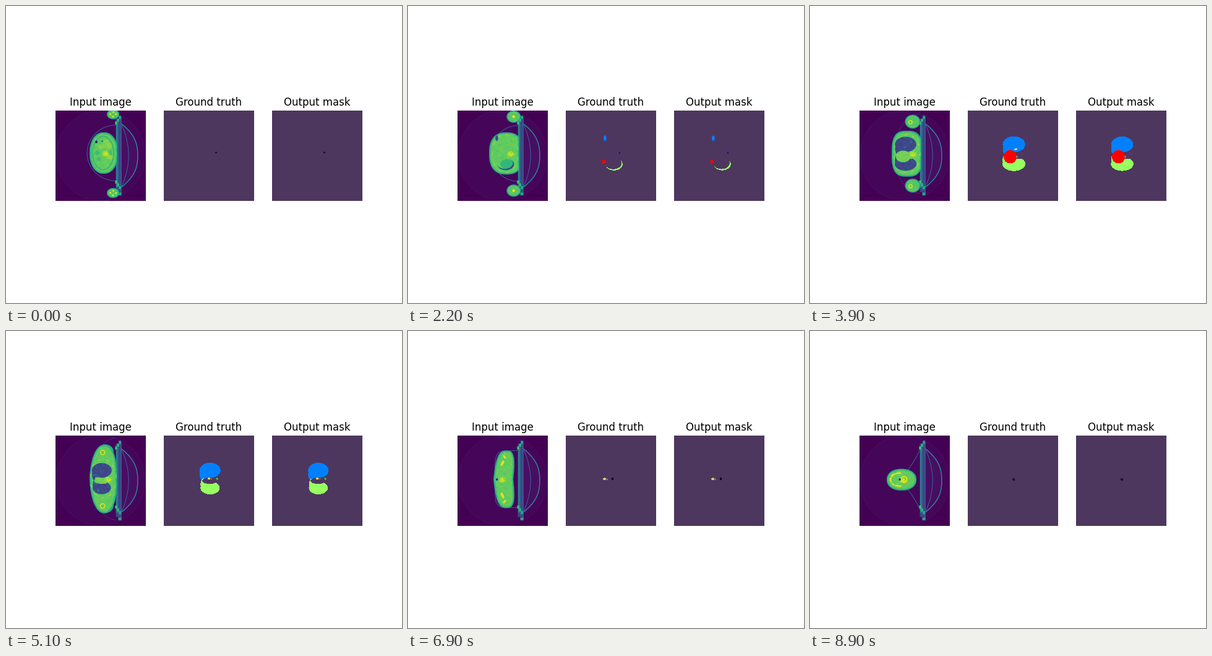
Write a matplotlib script that moves like this. It is 640 px wide and 480 px high and loops after 9000 ms.

```python
import numpy as np
import matplotlib.pyplot as plt
from matplotlib.animation import FuncAnimation

FRAMES, STEP = 90, 100
N = 146
X0, Y0, SIDE = 80.0, 169.46, 145.88
MID = 239
grid = (np.arange(N) + 0.5) * SIDE / N
X, Y = np.meshgrid(X0 + grid, Y0 + grid)

BACK = (77, 55, 94)
BLUE, GREEN, RED = (0, 128, 255), (151, 255, 96), (255, 0, 0)
YELLOW, GREY = (222, 214, 92), (134, 110, 134)
CORD_COLOURS = [(24, 20, 22), (40, 0, 165), (112, 48, 108),
                (70, 172, 48), (12, 2, 10), (46, 0, 62)]

# a few stations along the body, from belly to head
TIMES = [0, 2.2, 3.9, 5.1, 5.9, 6.9, 8.9]
TRACKS = {
    "x": [158, 159, 157, 157, 158, 154, 148],
    "half_w": [23, 28, 25, 22, 20, 16, 24],
    "half_h": [33.5, 34, 37, 55.5, 52, 46.5, 17.5],
    "power": [2.2, 2.5, 3, 2.2, 2.4, 3, 2.2],
    "bow": [0, 0, 0, 2, 2, 5, 0],
    "cord": [164.5, 167, 167.5, 166, 163, 155.5, 154],
    "sheet_h": [45, 45, 64, 66, 56, 46, 50],
    "sheet_p": [2, 2, 2, 2, 2, 6, 0.85],
}


def at(name, t):
    return np.interp(t, TIMES, TRACKS[name])


def ramp(t, a, b):
    return float(np.clip((t - a) / (b - a), 0, 1))


def bump(t, a, b):
    """Half a sine wave between a and b, zero outside."""
    return max(0.0, float(np.sin(np.pi * ramp(t, a, b))))


def fade(t, a, b, c, d):
    return ramp(t, a, b) * (1 - ramp(t, c, d))


# shapes are level sets: f < 0 inside, converted to a pixel distance
def distance(f):
    gy, gx = np.gradient(f)
    return f / np.maximum(np.hypot(gx, gy), 1e-3)


def fill(f):
    return np.clip(0.5 - distance(f), 0, 1)


def line(f, w):
    return np.clip(w / 2 + 0.5 - abs(distance(f)), 0, 1)


def ellipse(x, y, a, b, tilt=0, p=2):
    c, s = np.cos(np.radians(tilt)), np.sin(np.radians(tilt))
    dx, dy = X - x, Y - y
    u, v = (dx * c + dy * s) / a, (dy * c - dx * s) / b
    return (abs(u) ** p + abs(v) ** p) ** (1 / p) - 1


def oval(x, y, a, b, tilt=0):
    if min(a, b) < 0.3:
        return np.zeros_like(X)
    return fill(ellipse(x, y, a, b, tilt))


def box(x, y, a, b):
    return (np.clip(a + 0.5 - abs(X - x), 0, 1)
            * np.clip(b + 0.5 - abs(Y - y), 0, 1))


def lay(img, cover, value, alpha=1.0):
    img += cover * alpha * (value - img)


def scanner():
    """The still part of the scan: gantry disc, couch and its curved shell."""
    img = np.zeros_like(X)
    disc = ellipse(153, 242, 72, 73)
    lay(img, fill(disc), 0.018)
    lay(img, line(disc, 1), 0.035)

    d = abs(Y - 242)
    beyond = X > 185.5
    outer = X - 186 - 26.7 * (1 - (d / 51.5) ** 2.5)
    inner = X - 186 - 12 * (1 - (d / 51.5) ** 2)
    lay(img, fill(outer) * beyond, 0.04)
    lay(img, line(outer, 1.2) * beyond, 0.53)
    lay(img, line(inner, 0.7) * beyond, 0.4)

    lay(img, box(182, 242, 4.5, 59), 0.19)
    lay(img, box(179.3, 242, 1.1, 52), 0.5)
    lay(img, box(182, 242, 0.5, 58), 0.33)
    lay(img, box(185.7, 242, 0.7, 63), 0.32)
    for k in range(3):
        for side in (-1, 1):
            y = 237.2 + side * (47.7 + 4.5 * k)
            lay(img, box(178 + 3 * k, y, 1.8, 2.5), 0.7 - 0.04 * k)
    lay(img, box(184, 304, 2.4, 2.3), 0.6)
    return img


SCANNER = scanner()


def grain(seed):
    g = np.random.default_rng(seed).normal(size=(N, N))
    for axis in (0, 1):
        g = (g + np.roll(g, 1, axis) + np.roll(g, -1, axis)) / 1.8
    return g


def dome(t):
    """How far the liver still pushes into the chest."""
    return 1 - ramp(t, 1.4, 3.2)


def lungs(t, scale=1.0):
    """Coverage of the upper and the lower lung."""
    lift = dome(t)
    parts = []
    for side, start, height in ((-1, 2.18, 13), (1, 1.2, 11.5)):
        s = bump(t, start, 6.4)
        a, b = 18.5 * s ** 0.5 * scale, height * s ** 0.25 * scale
        x = 154.5 + ramp(t, 5, 6) * 2.5 + lift * (6 if side > 0 else -20)
        y = 239.8 + side * (15.8 - 3 * ramp(t, 4, 6)) + lift * (1 if side > 0 else -18)
        cover = oval(x, y, a, b)
        if lift == 0:
            cover = np.maximum(cover, oval(x - 0.65 * a, y - side * 0.55 * b,
                                           0.34 * a, 0.9 * b))
        elif side > 0:
            k = min(1.1, 1.3 * lift ** 0.5)
            cover = cover * (1 - oval(x - 1.3, y - 1.8, a * k, b * k))
        parts.append(cover)
    s = bump(t, 2.18, 6.4)
    gap = oval(162 - 8 * ramp(t, 3.9, 5.1), 242.5, 13 * s ** 0.5, 5.2 * s ** 0.25)
    keep = 1 - gap * (lift == 0)
    return [part * keep for part in parts]


def heart(t):
    r = 12 * bump(t, 2, 4.9)
    return oval(148.5 - 13 * dome(t), 244 + 14 * dome(t), min(r, 10.6), min(r * 1.3, 10.8))


def draw_arms(img, t, tex):
    x = 173 - 0.47 * t * t
    a, b, r = 10 + 0.6 * t, 8 + 0.8 * t, 0.7 * t
    for side in (-1, 1):
        y = MID + side * (63.5 - 0.78 * t * t)
        lay(img, oval(x, y, a, b), 0.6)
        lay(img, oval(x, y, a - 1.5, b - 1.5), 0.74 + 0.01 * tex)
        if t < 1.1:
            for q in np.arange(4) * 1.6 + t:
                lay(img, oval(x + 4.5 * np.cos(q), y + 3.6 * np.sin(q), 1.5, 1.2), 0.97)
        elif r < 2:
            lay(img, oval(x, y, r + 0.7, r + 0.7), 0.97)


def draw_arm_bones(img, t):
    show = fade(t, 2.8, 3, 6, 6.5)
    r = max(0.7 * t, 1)
    for side in (-1, 1):
        bone = ellipse(173 - 0.47 * t * t - 0.9 * t,
                       MID + side * (63.5 - 0.78 * t * t) + 1, r, r)
        lay(img, line(bone, 1.3), 0.98, show)


def draw_belly(img, body, tex, show):
    rng = np.random.default_rng(5)
    lay(img, line(ellipse(157, 238, 17, 27), 2) * body, 0.67, show)
    for _ in range(9):
        q, r = rng.uniform(0, 2 * np.pi), rng.uniform(0.4, 0.75)
        organ = oval(157 + 17 * r * np.cos(q), 238 + 27 * r * np.sin(q),
                     *rng.uniform(3, 6, 2))
        lay(img, organ, rng.choice([0.69, 0.8, 0.82]) + 0.01 * tex, show)
    lay(img, oval(146, 220, 2, 2.2), 0.08, show)
    lay(img, oval(155.5, 219, 1.3, 1.3), 0.35, show)


def scan(i):
    t = i * STEP / 1000
    img, tex = SCANNER.copy(), grain(i)
    cy = 238 + 0.3 * t
    cord = at("cord", t)

    sheet = ellipse(178, cy, 47 - 1.4 * t, at("sheet_h", t), p=at("sheet_p", t))
    glow = 0.4 - 0.25 * fade(t, 2.5, 3.6, 5.9, 6.9)
    img = np.maximum(img, line(sheet, 0.7) * (X < 178) * glow)
    if t < 6:
        draw_arms(img, t, tex)

    half_h = at("half_h", t)
    cx = at("x", t) + at("bow", t) * abs(Y - cy) / half_h
    shape = ellipse(cx, cy, at("half_w", t), half_h, p=at("power", t))
    body = fill(shape) * np.clip(180 - X, 0, 1)
    depth = np.minimum(-distance(shape), 180 - X)
    lay(img, body, 0.58 + 0.18 * np.clip(depth / 3.5, 0, 1) + 0.011 * tex)

    if t < 2:
        draw_belly(img, body, tex, fade(t, -1, 0, 0.9, 2))
    spleen = fade(t, 1, 2, 2.4, 3.1)
    lay(img, oval(160, 256, 11, 8) * body, 0.62, 0.7 * spleen)

    ang = np.arctan2((Y - MID) / 31, (X - 157) / 21)
    dashes = np.clip(3 * np.cos(11 * ang + 1.5 * t) - 1, 0, 1)
    ribs = line(ellipse(157, MID, 21, 31), 1.2) * dashes * body
    lay(img, ribs, 0.92, 0.2 + 0.5 * fade(t, 0, 3, 5.5, 6.2) - 0.2 * ramp(t, 5.5, 6.4))

    air = np.maximum(*lungs(t, 0.95)) * body
    lay(img, air, np.clip(0.22 + 0.02 * tex, 0.1, 0.5))
    lay(img, air * np.clip(tex - 1.6, 0, 1), 0.55, 0.6)
    lay(img, oval(150.5, 243.5, 12, 9.5), 0.79 + 0.012 * tex, fade(t, 2.4, 3.3, 4.2, 4.9))
    lay(img, oval(153, 242, 10, 3.5, 25), 0.8, fade(t, 4.4, 4.9, 5.3, 5.7))
    draw_arm_bones(img, t)

    # spine: a bright core with spokes
    spine = cord - 3 + 2 * fade(t, 0.5, 2, 5.1, 5.9)
    lay(img, oval(spine - 2, cy + 1, 4, 4.5) * body, 0.84 + 0.02 * tex)
    for tilt in (-40, 0, 40, 90):
        lay(img, oval(spine + 1, cy + 1, 5, 0.9, tilt) * body, 0.95, 0.85)
    lay(img, oval(cord, cy, 1.1, 1.2) * body, 0.78)

    # shoulder blades and collar bones
    girdle, collar = fade(t, 5.6, 6.5, 7.1, 7.7), fade(t, 5, 5.6, 6.1, 6.5)
    for side in (-1, 1):
        lay(img, oval(152.5, cy + side * 26, 2, 5, -25 * side) * body, 0.96, girdle)
        lay(img, oval(156, cy + side * 36, 3.6, 1.5, -50 * side) * body, 0.96, girdle)
        lay(img, oval(143, cy + side * 6.5, 4, 1.3) * body, 0.95, collar)
        lay(img, oval(163, cy + side * 25, 1.2, 4) * body, 0.95, collar)

    # jaw and airway
    jaw = ramp(t, 7.5, 8.2)
    arch = line(ellipse(145, 240.5, 15, 10.5), 2.4) * np.clip((149 - X) / 3, 0, 1)
    lay(img, arch * np.clip(tex + 1.3, 0, 1) * body, 0.97, jaw)
    lay(img, line(ellipse(152, 240.3, 4.5, 5), 1.6) * body, 0.97, jaw)
    lay(img, oval(143.5 + 1.5 * jaw, 240.3, 1.6, 1.9) * body, 0.05, ramp(t, 6, 6.5))
    return np.clip(img, 0, 1)


def mask(i, predicted):
    t = i * STEP / 1000
    scale = 0.985 if predicted else 1.0
    img = np.empty((N, N, 3), np.uint8)
    img[:] = BACK

    def paint(cover, colour):
        img[cover > 0.5] = colour

    upper, lower = lungs(t, scale)
    paint(upper, BLUE)
    paint(lower, GREEN)
    paint(heart(t), RED)

    cord, y = at("cord", t), 237.3 + 0.34 * t
    tube = bump(t, 4.4, 7.8) ** 0.3
    paint(oval(cord - 9, y + 0.5, 1.4 * tube, 1.5 * tube), GREY)
    paint(oval(cord - 13, y, 2.5 * tube, 2.1 * tube), YELLOW)
    size = 1.2 + 0.8 * ramp(t, 0, 9)
    paint(oval(cord, y, size, size + 0.4), CORD_COLOURS[min(int(t / 1.4), 5)])

    if 3.3 < t < 4.4:
        paint(oval(159.5, 244, 1.4, 2), GREY)
        if not predicted:
            paint(oval(157.5, 232, 2.6, 1.6, -20), YELLOW)
    return img


fig, axes = plt.subplots(1, 3, figsize=(6.4, 4.8), dpi=100)
EXTENT = (X0, X0 + SIDE, Y0 + SIDE, Y0)
VIEWS = {
    "Input image": scan,
    "Ground truth": lambda i: mask(i, False),
    "Output mask": lambda i: mask(i, True),
}
pictures = []
for ax, (title, view) in zip(axes, VIEWS.items()):
    ax.set_title(title)
    ax.axis("off")
    pictures.append(ax.imshow(view(0), cmap="viridis", vmin=0, vmax=1, extent=EXTENT))


def draw(i):
    for picture, view in zip(pictures, VIEWS.values()):
        picture.set_data(view(i))
    return pictures


anim = FuncAnimation(fig, draw, frames=FRAMES, interval=STEP, repeat=True,
                     repeat_delay=0, blit=False)
plt.show()
```
